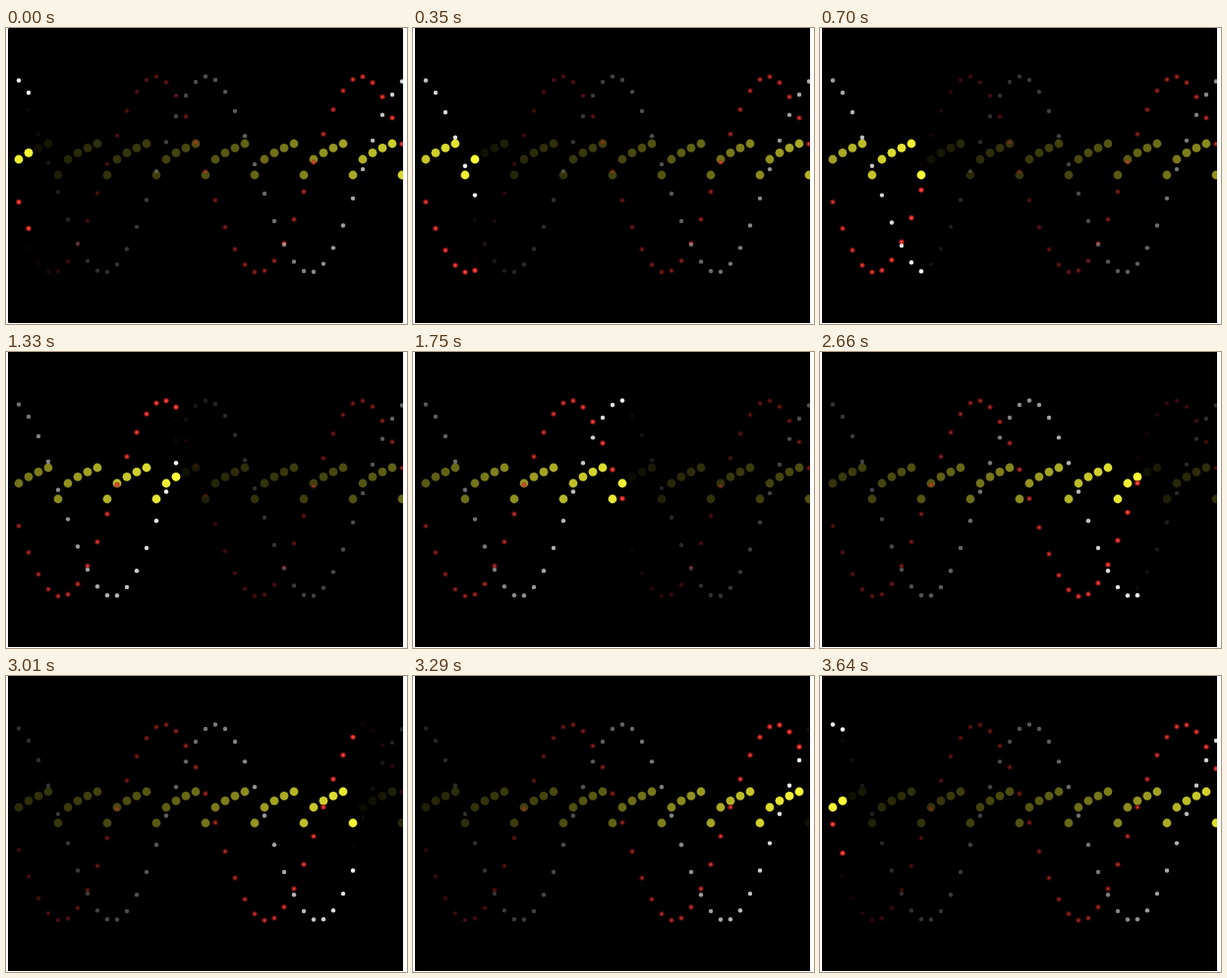
These frames come from a looping animation (408 px wide and 302 px high, 3710 ms). An HTML page with a canvas:

```html
<!DOCTYPE html>
<html lang="en">
<head>
<meta charset="utf-8">
<title>Wave dots</title>
<style>
  html, body { margin: 0; height: 100%; overflow: hidden; background: #fff; }
  canvas { display: block; }
</style>
</head>
<body>
<canvas id="stage" width="408" height="302"></canvas>
<script>
const ctx = document.getElementById('stage').getContext('2d');
const LOOP = 3710, TICK = 70;
const COLUMNS = 41;          // dots per sweep; the last one lies off the edge
const STEPS_PER_TICK = 0.783;
const MIDDLE = 149.5, AMPLITUDE = 100;

ctx.beginPath();
ctx.roundRect(2, 0, 402, 301, 2);
ctx.clip();

function dot(x, y, radius, color) {
  ctx.fillStyle = color;
  ctx.beginPath();
  ctx.arc(x, y, radius, 0, 2 * Math.PI);
  ctx.fill();
}

function drawStep(n, age) {
  const column = ((n - 1) % COLUMNS + COLUMNS) % COLUMNS + 1;
  const x = 3 + 10 * column;
  const angle = 0.3 * (n - 21);
  const redY = MIDDLE + AMPLITUDE * Math.sin(angle);
  ctx.globalAlpha = Math.exp(-0.05 * age) * Math.min(1, Math.max(0, (43 - age) / 6));
  dot(x, 150 - 16 * Math.sqrt(column % 5), 4.4, '#ffff38');
  dot(x, redY, 2.7, '#b01c1c');
  dot(x, redY, 1.5, '#ff4a40');
  dot(x, MIDDLE - AMPLITUDE * Math.cos(angle), 2.2, '#fff');
}

function draw() {
  const tick = Math.floor(performance.now() % LOOP / TICK);
  const phase = 2.31 + tick * STEPS_PER_TICK;
  const head = Math.floor(phase);
  ctx.globalAlpha = 1;
  ctx.fillStyle = '#000';
  ctx.fillRect(0, 0, 408, 302);
  for (let n = head - COLUMNS; n <= head; n++) drawStep(n, phase - n);
  requestAnimationFrame(draw);
}
draw();
</script>
</body>
</html>
```
